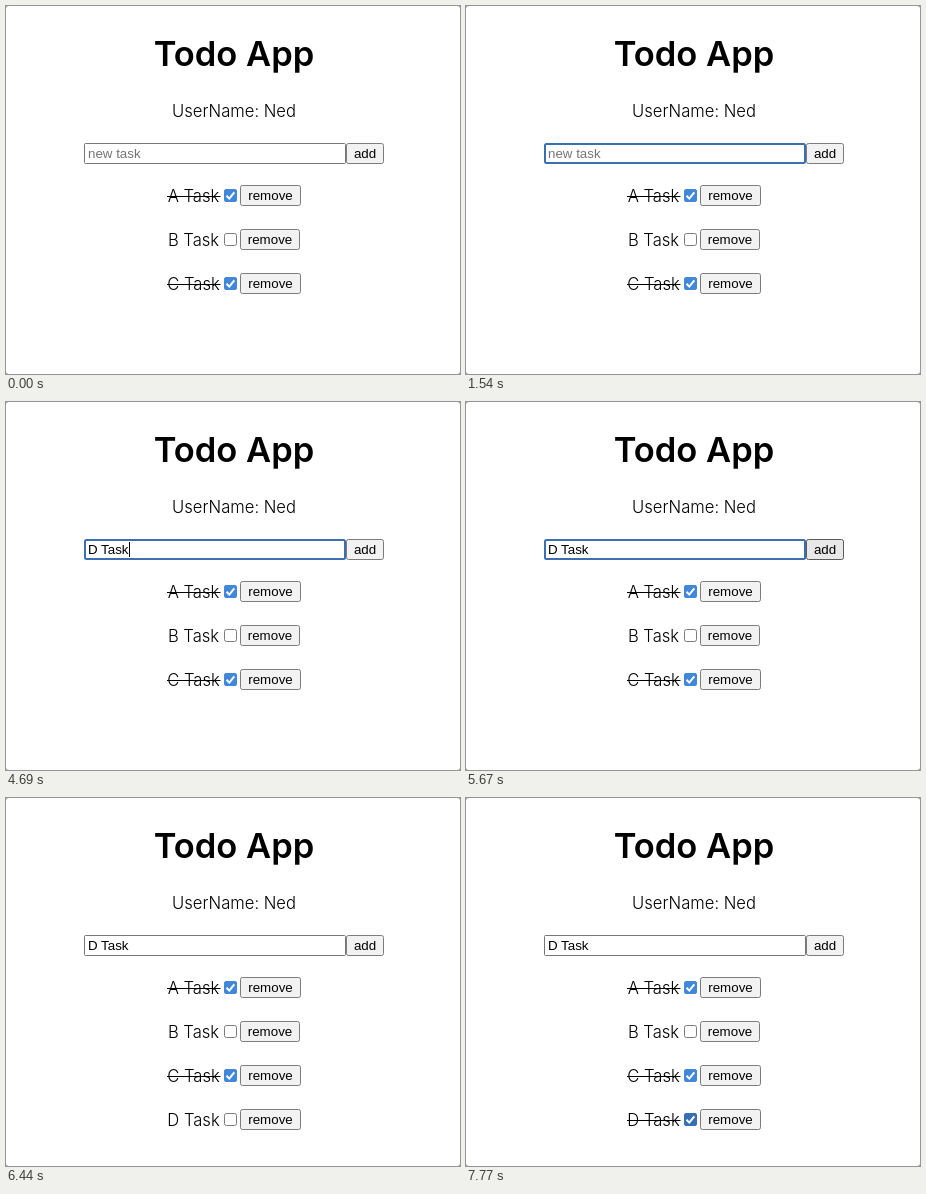
Recreate the animation shown at these times as an HTML page. Size 454 by 368 pixels, loop 8000 ms.

```html
<!DOCTYPE html>
<html lang="en">
<head>
<meta charset="utf-8">
<title>Todo App</title>
<style>
html, body { margin: 0; width: 100%; height: 100%; overflow: hidden; background: #fff; }
svg { display: block; width: 454px; height: 368px; }
text { font: 300 16.6px Inter, sans-serif; text-anchor: middle; white-space: pre; }
.title { font-size: 34.5px; font-weight: 600; }
.ui { font: 13.333px "Liberation Sans", Arial, sans-serif; }
.field { text-anchor: start; }
</style>
</head>
<body>
<svg id="stage" viewBox="0 0 454 368"></svg>
<script>
const LOOP = 8000;
const stage = document.getElementById('stage');

// start time, typed text, caret x
const typing = [
  [0, '', 82], [2870, 'D', 92], [3290, 'D ', 95], [3640, 'D T', 103],
  [3990, 'D Ta', 109], [4340, 'D Tas', 116], [4690, 'D Task', 123]
];
const caretSpans = [[840, 1540], [2030, 2590], [2870, 5250], [5740, 5880]];

const buttonLook = {
  idle: ['#f2f2f2', '#7c7c7c'],
  hover: ['#e8e8e8', '#5a5a5a'],
  active: ['#f7f7f7', '#939393']
};

const within = (t, from, to) => t >= from && t < to;

const box = (x, y, w, h, r, fill, line) =>
  `<rect x="${x + .5}" y="${y + .5}" width="${w - 1}" height="${h - 1}" rx="${r}" fill="${fill}" stroke="${line}"/>`;

const label = (x, y, str, cls = '') => `<text x="${x}" y="${y}" class="${cls}">${str}</text>`;

function button(x, y, w, str, look) {
  return box(x, y, w, 21, 2, ...buttonLook[look]) + label(x + w / 2, y + 15, str, 'ui');
}

function checkbox(x, y, checked, look) {
  if (!checked) return box(x, y, 13, 13, 2, '#fff', buttonLook[look][1]);
  const blue = look === 'hover' ? '#366fb5' : '#4288da';
  return box(x, y, 13, 13, 1.5, blue, blue) +
    `<path d="M${x + 2.5} ${y + 6.8}l2.8 2.8l5-6.2" fill="none" stroke="#fff" stroke-width="2"/>`;
}

function field(t) {
  const focused = within(t, 840, 5880);
  const [, str, caretX] = typing.findLast(step => t >= step[0]);
  let out = focused
    ? '<rect x="79" y="138" width="260" height="19" rx="1.5" fill="#fff" stroke="#3a70b2" stroke-width="2"/>'
    : box(78, 137, 262, 21, 1, '#fff', '#767676');
  out += str
    ? label(82, 152, str, 'ui field')
    : '<text x="82" y="152" class="ui field" fill="#757575">new task</text>';
  if (caretSpans.some(span => within(t, ...span)))
    out += `<rect x="${caretX}" y="140" width="1" height="15"/>`;
  return out;
}

function row(i, done, removeLook, checkLook) {
  const y = 179 + 44 * i;
  return label(187.5, y + 17, 'ABCD'[i] + ' Task') +
    (done ? `<rect x="161" y="${y + 11}" width="53.5" height="1"/>` : '') +
    checkbox(218, y + 4, done, checkLook) +
    button(234, y, i === 1 ? 60 : 61, 'remove', removeLook);
}

function scene(t) {
  const addLook = within(t, 5880, 5950) ? 'active' : within(t, 5670, 6440) ? 'hover' : 'idle';
  const hover = (from, to) => within(t, from, to) ? 'hover' : 'idle';
  let out = '<rect width="454" height="368" fill="#999"/><rect width="454" height="368" rx="3" fill="#fff"/>' +
    label(228, 60, 'Todo App', 'title') +
    label(228, 111, 'UserName: Ned') +
    field(t) + button(340, 137, 38, 'add', addLook) +
    row(0, true, 'idle', 'idle') +
    row(1, false, 'idle', 'idle') +
    row(2, true, hover(6580, 6650), 'idle');
  if (t >= 5950) {
    const checkLook = within(t, 7630, 7770) ? 'active' : hover(7490, LOOP);
    out += row(3, t >= 7770, hover(6650, 7000), checkLook);
  }
  return out;
}

let shown = '';
function draw() {
  const next = scene(performance.now() % LOOP);
  if (next !== shown) stage.innerHTML = shown = next;
  requestAnimationFrame(draw);
}
draw();
</script>
</body>
</html>
```
